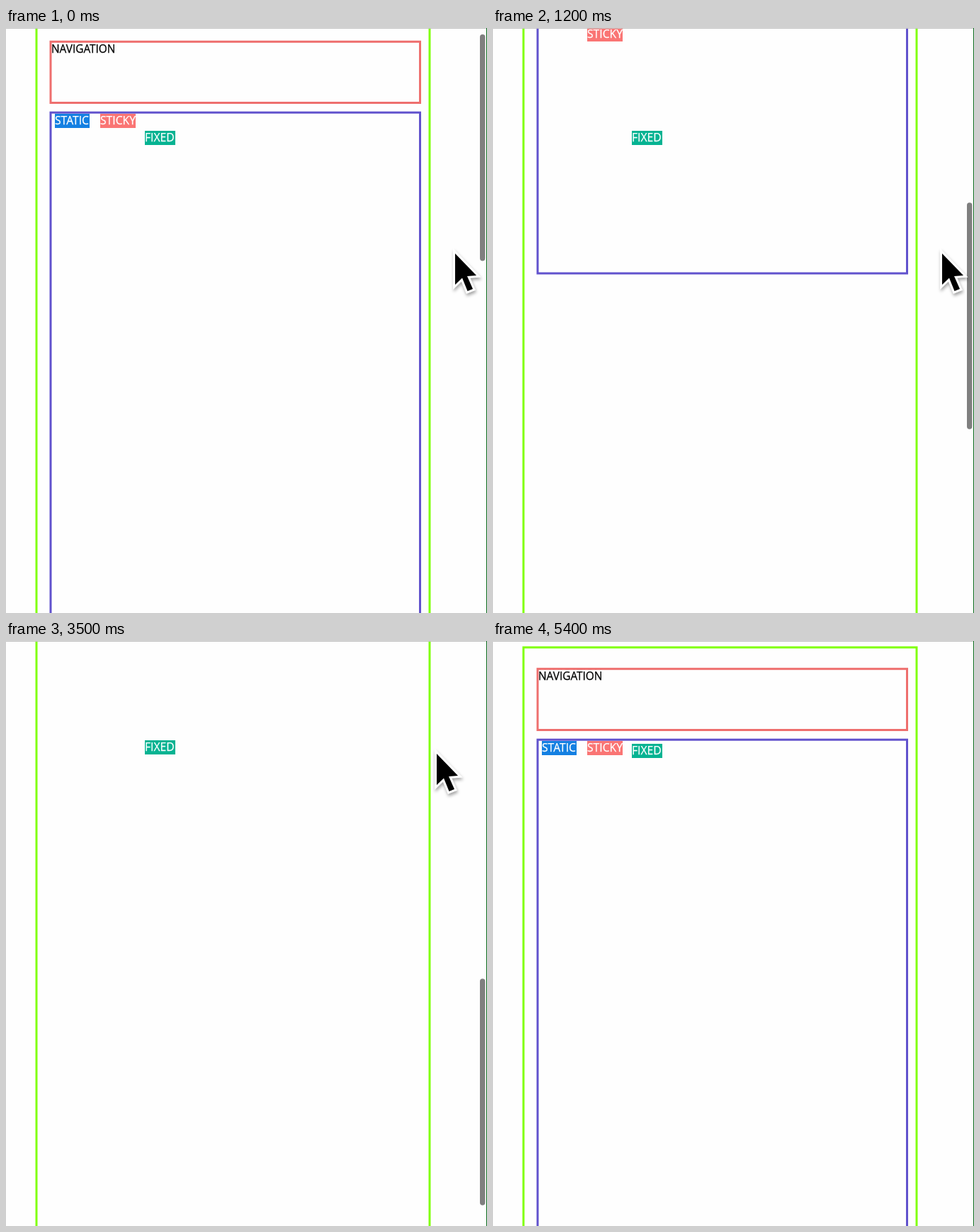
These frames come from a looping animation (679x825 px, 5.98 s). An HTML page:

```html
<!DOCTYPE html>
<html lang="en">
<head>
<meta charset="utf-8">
<title>Static, sticky and fixed positions</title>
<style>
  html, body { margin: 0; width: 100%; height: 100%; overflow: hidden; background: #fefefe; }
  svg { display: block; width: 679px; height: 825px; }
  text { font: 15.7px "Open Sans", "Noto Sans", sans-serif; fill: #fff; stroke: #fff; stroke-width: .25; }
  #title { font-size: 15.4px; fill: #000; stroke: #000; }
  .frame { fill: none; stroke-width: 3; }
  #cursor { filter: drop-shadow(1px 3px 2px rgba(0, 0, 0, .35)); }
</style>
</head>
<body>
<svg viewBox="0 0 679 825">
  <g id="view">
    <g id="page">
      <rect class="frame" x="43" y="9" width="555" height="2107" stroke="#80ff0c"/>
      <rect class="frame" x="63" y="39.3" width="521.5" height="86.2" stroke="#ee6f6e"/>
      <text id="title" x="64" y="55">NAVIGATION</text>
      <rect class="frame" x="63" y="139.2" width="521.5" height="836.8" stroke="#6152cd"/>
      <g transform="translate(69 141)">
        <rect width="49" height="20" fill="#1480e2"/>
        <text y="14.5">STATIC</text>
      </g>
    </g>
    <g id="sticky">
      <rect width="50" height="20" fill="#fa7574"/>
      <text y="14.5">STICKY</text>
    </g>
    <g transform="translate(196 145)">
      <rect width="43" height="20" fill="#06b392"/>
      <text y="14.5">FIXED</text>
    </g>
    <rect id="thumb" x="669" width="7.4" height="319.5" rx="3.7" fill="#7f7f7f"/>
  </g>
  <g id="cursor">
    <path d="M3 8V52L13 42.5L20.500 61L28 58L20 40L33 39Z" fill="#000"
      stroke="#fff" stroke-width="6" stroke-miterlimit="6" paint-order="stroke"/>
  </g>
  <rect width="679" height="1" fill="#c4c4c4"/>
  <rect x="678" width="1" height="825" fill="#0b6b1d"/>
</svg>
<script>
const LOOP = 5980, STEP = 100;

// Smooth monotone curve through [time, value] points, flat at both ends.
function curve(...points) {
  const slope = i => {
    const a = points[i], b = points[i + 1];
    return a && b ? (b[1] - a[1]) / (b[0] - a[0]) : 0;
  };
  const tangent = i => {
    const before = slope(i - 1), after = slope(i);
    return before * after > 0 ? 2 * before * after / (before + after) : 0;
  };
  return time => {
    const next = points.findIndex(point => point[0] > time);
    if (next <= 0) return points[next ? points.length - 1 : 0][1];
    const [t0, v0] = points[next - 1], [t1, v1] = points[next];
    const span = t1 - t0, u = (time - t0) / span, w = 1 - u;
    return v0 * w * w * (1 + 2 * u) + v1 * u * u * (1 + 2 * w)
      + span * u * w * (tangent(next - 1) * w - tangent(next) * u);
  };
}

const scrollAt = curve([0, 20], [700, 378], [1200, 630], [1800, 943], [2000, 1111],
  [2400, 1297], [3300, 1297], [3500, 1234], [4200, 383], [4700, 0]);
const bounceAt = curve([2500, 0], [2800, -5], [4400, -5], [4700, 0]);
const cursorX = curve([2900, 631], [3300, 604], [3500, 605]);
const cursorY = curve([2900, 310], [3300, 104], [3500, 151]);
const cursorFade = curve([4700, 1], [5100, 0]);
const thumbFade = curve([4900, 1], [5300, 0]);

const [view, page, sticky, thumb, cursor] =
  ["view", "page", "sticky", "thumb", "cursor"].map(id => document.getElementById(id));
const move = (node, x, y) => node.setAttribute("transform", `translate(${x} ${y})`);

function draw(elapsed) {
  const time = Math.floor(elapsed % LOOP / STEP) * STEP;
  const scroll = scrollAt(time);
  move(view, 0, bounceAt(time));
  move(page, 0, -scroll);
  move(sticky, 133, Math.min(Math.max(141 - scroll, -1), 954 - scroll));
  move(thumb, 0, 1.2 + scroll * 0.389);
  move(cursor, cursorX(time), cursorY(time));
  thumb.setAttribute("opacity", thumbFade(time));
  cursor.setAttribute("opacity", cursorFade(time));
}

const start = performance.now();
function tick() {
  draw(performance.now() - start);
  requestAnimationFrame(tick);
}
tick();
</script>
</body>
</html>
```
